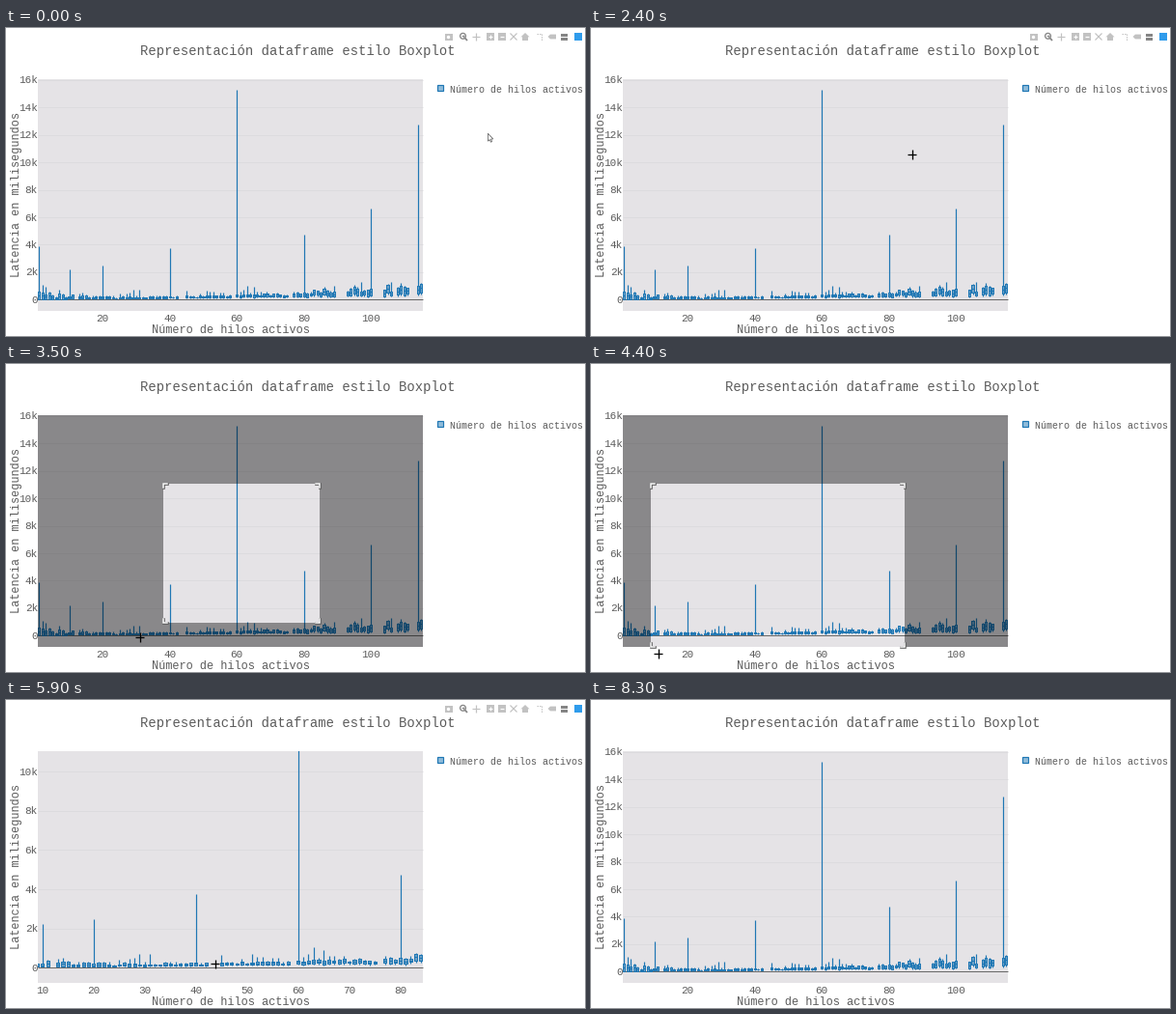
A matplotlib script that plays this animation: 600x319 px, repeating every 8400 ms.

```python
import math
import random

import matplotlib.pyplot as plt
import numpy as np
from matplotlib.animation import FuncAnimation
from matplotlib.collections import LineCollection, PolyCollection
from matplotlib.patches import Circle, Polygon, Rectangle

W, H, DPI = 600, 319, 100
PT = 72 / DPI
FRAMES, STEP = 84, 100

BLUE, INK, TEXT = "#1f77b4", "#444444", "#5c5c5c"
PLOT_BG, GRID = "#e5e3e6", "#dad9dc"
ICON, ICON_ON = "#c2c2c2", "#858585"
MONO, SANS = "Liberation Mono", "Liberation Sans"

LEFT, RIGHT, TOP, BOTTOM = 32.5, 432, 52.5, 293
FULL = (0.5, 115.5, -823, 16098)
ZOOM = (9.0, 84.4, -775, 11070)

# tall whiskers: active threads -> maximum latency
SPIKES = {1: 3900, 10: 2230, 20: 2480, 40: 3760, 60: 15300, 80: 4730,
          100: 6650, 114: 12770}
GAPS = ((12, 12), (43, 44), (59, 59), (76, 76), (90, 92), (101, 103),
        (107, 107), (112, 113))

PRESS, RELEASE, RESET = 29, 46, 61
CORNER = 325, 124
# cursor way points: frame, x, y
PATH = ((18, 500, 110), (24, 332.5, 131), (28, *CORNER), (31, 253, 214),
        (36, 110, 300), (41, 62, 300), (44, 69.5, 300), (54, 69.5, 300),
        (60, 246, 268), (67, 254, 266), (69, 319.3, 201), (73, 600, -60))


def make_stats():
    rnd = random.Random(5)
    stats = []
    for x in range(1, 116):
        if any(a <= x <= b for a, b in GAPS):
            continue
        u = x / 115
        q1 = 50 + 230 * u ** 1.5 + rnd.uniform(0, 350) * u ** 2
        size = 60 + 400 * math.exp(-x / 12) + 520 * u ** 3
        q3 = q1 + size * rnd.uniform(0.4, 1.5)
        tail = 40 + 650 * rnd.random() ** 4
        stats.append((x, q1 * 0.7, q1, (q1 + q3) / 2, q3, SPIKES.get(x, q3 + tail)))
    return stats


STATS = make_stats()


def cursor_at(i):
    t, x, y = zip(*PATH)
    return np.interp(i, t, x), np.interp(i, t, y)


fig = plt.figure(figsize=(W / DPI, H / DPI), dpi=DPI, facecolor="white")
ax = fig.add_axes([0, 0, 1, 1])


def text(x, y, s, px, font=MONO, color=TEXT, **kw):
    return ax.text(x, y, s, fontsize=px * PT, family=font, color=color, **kw)


def line(xs, ys, color, px, **kw):
    kw.setdefault("solid_capstyle", "butt")
    ax.plot(xs, ys, color=color, lw=px * PT, **kw)


def plus(x, y, r, color, px, **kw):
    line([x - r, x + r], [y, y], color, px, **kw)
    line([x, x], [y - r, y + r], color, px, **kw)


def rect(x0, y0, x1, y1, color, **kw):
    kw.setdefault("lw", 0)
    return ax.add_patch(Rectangle((x0, y0), x1 - x0, y1 - y0, fc=color, **kw))


def shape(points, color, **kw):
    kw.setdefault("lw", 0)
    ax.add_patch(Polygon(points, closed=True, fc=color, **kw))


def draw_plot(view):
    x0, x1, y0, y1 = view
    kx, ky = (RIGHT - LEFT) / (x1 - x0), (BOTTOM - TOP) / (y1 - y0)

    def px(v):
        return LEFT + (v - x0) * kx

    def py(v):
        return BOTTOM - (v - y0) * ky

    area = rect(LEFT, TOP, RIGHT, BOTTOM, PLOT_BG, zorder=0)
    for v in range(0, int(y1), 2000):
        if v:
            line([LEFT, RIGHT], [py(v)] * 2, GRID, 0.8, zorder=1)
        text(33, py(v) + 3.5, f"{v // 1000}k" if v else "0", 11, ha="right")
    gap = 20 if x1 > 100 else 10
    for v in range(gap, int(x1) + 1, gap):
        text(px(v), 304, str(v), 11, ha="center")
    line([LEFT, RIGHT], [py(0)] * 2, TEXT, 0.9, zorder=2)

    half = 0.3 * kx
    whiskers, bars, marks = [], [], []
    for v, low, q1, mid, q3, high in STATS:
        x, a, b = px(v), py(q1), py(q3)
        whiskers += [[(x, py(low)), (x, a)], [(x, b), (x, py(high))]]
        bars.append([(x - half, a), (x + half, a), (x + half, b), (x - half, b)])
        marks.append([(x - half, py(mid)), (x + half, py(mid))])
    parts = (LineCollection(whiskers, colors=BLUE, lw=1.2 * PT),
             PolyCollection(bars, facecolors=BLUE + "a0", edgecolors=BLUE,
                            lw=PT),
             LineCollection(marks, colors=BLUE, lw=PT))
    for part in parts:
        ax.add_collection(part, autolim=False)
        part.set_zorder(3)
        part.set_clip_path(area)


def draw_labels():
    text(302, 28, "Representación dataframe estilo Boxplot", 13.95, ha="center")
    text(232.8, 315.5, "Número de hilos activos", 11.95, ha="center")
    text(10.7, 172.6, "Latencia en milisegundos", 11.95, ha="center",
         va="center", rotation=90)
    rect(446.8, 58.5, 453, 65, "#8fbbd9", ec=BLUE, lw=1.2 * PT)
    text(460, 66.8, "Número de hilos activos", 10.03)


def draw_modebar(alpha):
    if alpha <= 0:
        return
    y, kw = 9, dict(alpha=alpha)
    # camera
    rect(454.5, 6.3, 462.5, 12.5, ICON, **kw)
    ax.add_patch(Circle((458.5, 9.5), 1.7, fc="white", lw=0, **kw))
    # magnifier
    ax.add_patch(Circle((473.5, 8.3), 2.9, fc="none", ec=ICON_ON,
                        lw=1.3 * PT, **kw))
    line([475.5, 478], [10.3, 13], ICON_ON, 1.7, **kw)
    plus(473.5, 8.3, 1.5, ICON_ON, 0.9, **kw)
    # pan
    plus(486.5, y, 4, ICON, 1.2, **kw)
    # zoom in and out
    for x in (502, 514):
        rect(x - 3.7, 5.3, x + 3.7, 12.7, ICON, **kw)
        line([x - 2.2, x + 2.2], [y, y], "white", 1.2, **kw)
    line([502, 502], [6.8, 11.2], "white", 1.2, **kw)
    # autoscale
    for s in (1, -1):
        line([522.5, 529.5], [y - 3.5 * s, y + 3.5 * s], ICON, 1.2, **kw)
    # home
    shape([(533.5, 9.3), (538, 5), (542.5, 9.3)], ICON, **kw)
    rect(535, 9.3, 541, 12.8, ICON, **kw)
    # spike lines
    line([549.5, 555, 555], [6, 6, 13], ICON, 1, ls=(0, (1.5, 1)), **kw)
    # hover modes
    shape([(561.5, y), (564, 6.6), (570, 6.6), (570, 11.4), (564, 11.4)],
          ICON, **kw)
    for top in (5.8, 9.6):
        rect(574.5, top, 582, top + 2.9, ICON_ON, **kw)
    rect(589.3, 5, 597.3, 13, "#2f9cec", **kw)


def draw_drag(i):
    # the selection trails the pointer a little and stays inside the plot
    x0, y1 = cursor_at(min(i - 0.85, 41))
    x1, y0 = CORNER
    x0, y1 = min(x0, x1), min(y1, BOTTOM)
    dim = np.interp(i, [28, 32], [0.28, 0.4])
    for box in ((LEFT, TOP, RIGHT, y0), (LEFT, y1, RIGHT, BOTTOM),
                (LEFT, y0, x0, y1), (x1, y0, RIGHT, y1)):
        rect(*box, "black", alpha=dim, zorder=5, aa=False)
    arm = min(4, (x1 - x0) / 2, (y1 - y0) / 2)
    for x, sx in ((x0, 1), (x1, -1)):
        for y, sy in ((y0, 1), (y1, -1)):
            for color, w in ((TEXT, 2.6), ("white", 1.5)):
                line([x + sx * arm, x, x], [y, y, y + sy * arm], color, w,
                     zorder=6, solid_capstyle="projecting",
                     solid_joinstyle="miter")


def draw_hover(x, name, top, rows):
    rect(x - 5.6, 296, x + 5.6, 306, INK, zorder=7)
    shape([(x, 293), (x - 3, 296), (x + 3, 296)], INK, zorder=7)
    text(x, 304, name, 8.6, color="white", ha="center", zorder=7.1)
    for k, row in enumerate(rows):
        text(x + 5.2, top + 10.35 * k + 2.3, row, 6.6, SANS, "white", zorder=8,
             bbox=dict(boxstyle="square,pad=0.26", fc=BLUE, ec="#d3e2ee",
                       lw=0.4 * PT))


def draw_cursor(i):
    x, y = cursor_at(i)
    if LEFT < x < RIGHT and TOP < y < 310:
        plus(x, y, 4.7, "black", 1.3, zorder=10)
    elif x < W and y > -10:
        arrow = np.array([(0, 0), (0, 8), (1.8, 6.4), (3, 9), (4.2, 8.4),
                          (3.1, 5.9), (5.4, 5.7)])
        shape(arrow + (x - 0.6, y - 0.8), "white", ec="#666666", lw=0.8 * PT,
              zorder=10)


def draw(i):
    ax.clear()
    ax.set_xlim(0, W)
    ax.set_ylim(H, 0)
    ax.axis("off")
    draw_plot(ZOOM if RELEASE <= i < RESET else FULL)
    draw_labels()
    draw_modebar(np.interp(i, [27, 30, 45, 48, 75, 79], [1, 0, 0, 1, 1, 0]))
    if PRESS <= i < RELEASE:
        draw_drag(i)
    elif RELEASE < i < 56:
        draw_hover(65.2, "15", 262.8, ("q3: 396", "median: 216", "min: 36"))
    elif RESET < i < 71:
        draw_hover(253.3, "64", 249.2,
                   ("max: 1324", "mean: 433.8333", "q3: 309",
                    "median: 295.5", "q1: 202", "min: 177"))
    draw_cursor(i)
    return []


anim = FuncAnimation(fig, draw, frames=FRAMES, interval=STEP, repeat=True,
                     repeat_delay=0, init_func=lambda: draw(0))
plt.show()
```
